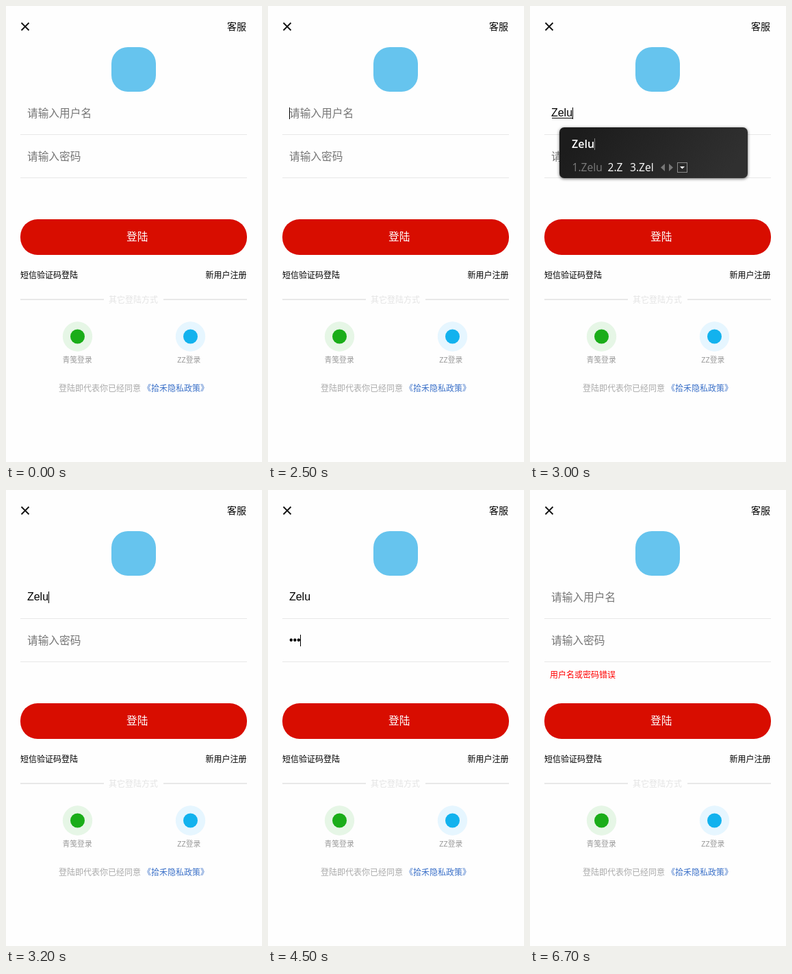
An HTML page with a canvas that plays this animation: 374 px wide and 665 px high, repeating every 8000 ms.

```html
<!DOCTYPE html>
<html lang="zh-CN">
<head>
<meta charset="utf-8">
<title>登陆</title>
<style>
  html, body { margin: 0; width: 100%; height: 100%; overflow: hidden; background: #fefefe; }
  canvas { display: block; }
</style>
</head>
<body>
<canvas id="stage" width="374" height="665"></canvas>
<script>
const ctx = document.getElementById('stage').getContext('2d');

const LOOP = 8000;
const CJK = '"Noto Sans CJK SC", "Noto Sans CJK", sans-serif';
const FIELD = '"Liberation Sans", Arial, sans-serif';
const IME = '"Open Sans", "Noto Sans", sans-serif';
const USER = 'Zelu';
const LEFT = 30.9;

// Times at which each character appears
const userKeys = [2700, 2800, 2900, 3000];
const passKeys = [4200, 4300, 4500, 4600, 4600, 4800];
const caretOn = [[700, 1100], [1600, 2100], [2500, 3900], [4200, 5200], [5700, 6100]];
const IME_END = 3200, PASS_FOCUS = 3500, FAIL = 6700;

const typed = (keys, t) => t < FAIL ? keys.filter(k => t >= k).length : 0;

function text(str, x, y, size, color, family = CJK, weight = 400) {
  ctx.font = `${weight} ${size}px ${family}`;
  ctx.fillStyle = color;
  ctx.fillText(str, x, y);
  return ctx.measureText(str).width;
}

function rect(x, y, w, h, color) {
  ctx.fillStyle = color;
  ctx.fillRect(x, y, w, h);
}

function roundRect(x, y, w, h, r, color) {
  ctx.beginPath();
  ctx.roundRect(x, y, w, h, r);
  ctx.fillStyle = color;
  ctx.fill();
}

function disc(x, y, r, color) {
  ctx.beginPath();
  ctx.arc(x, y, r, 0, Math.PI * 2);
  ctx.fillStyle = color;
  ctx.fill();
}

function triangle(x1, y1, x2, y2, x3, y3, color) {
  ctx.beginPath();
  ctx.moveTo(x1, y1);
  ctx.lineTo(x2, y2);
  ctx.lineTo(x3, y3);
  ctx.fillStyle = color;
  ctx.fill();
}

function drawPage() {
  rect(0, 0, 374, 665, '#fefefe');

  ctx.strokeStyle = '#111';
  ctx.lineWidth = 1.8;
  ctx.beginPath();
  ctx.moveTo(22.5, 24.5);
  ctx.lineTo(33.5, 35.5);
  ctx.moveTo(33.5, 24.5);
  ctx.lineTo(22.5, 35.5);
  ctx.stroke();
  text('客服', 323, 35, 14, '#000');

  roundRect(154, 60, 65, 65, 24, '#66c4ee');

  rect(21, 187, 331, 1, '#e8e8e8');
  rect(21, 250, 331, 1, '#e8e8e8');

  roundRect(21, 311, 331, 52, 25, '#d80d00');
  text('登陆', 176, 342, 15.7, '#fff');
  text('短信验证码登陆', 21, 397, 12, '#000');
  text('新用户注册', 291.5, 397, 12, '#000');

  rect(21, 427, 122, 2, '#e8e8e8');
  rect(230, 427, 122, 2, '#e8e8e8');
  text('其它登陆方式', 150, 433, 12, '#e4e4e4');

  disc(104.5, 482, 21.7, '#e6f6e6');
  disc(104.5, 482, 10.5, '#1aad19');
  text('青笺登录', 82.5, 520, 10.8, '#999');
  disc(269.5, 482, 21.7, '#e6f6ff');
  disc(269.5, 482, 10.5, '#12b2ee');
  text('ZZ登录', 250, 520, 10.8, '#999');

  text('登陆即代表你已经同意', 77, 562, 12, '#aaa');
  text('《拾禾隐私政策》', 200, 562, 12, '#3a70c8');
}

function drawField(value, hint, baseline, caret) {
  const width = value
    ? text(value, LEFT, baseline, 16, '#000', FIELD)
    : (text(hint, 31, baseline + 0.5, 15.7, '#757575'), 0);
  if (caret) {
    const x = Math.max(31, Math.floor(LEFT + width));
    rect(x, baseline - 13, 1, 17, '#000');
  }
  return width;
}

function drawDropButton(x, y) {
  ctx.strokeStyle = '#8a8a8a';
  ctx.lineWidth = 1;
  ctx.strokeRect(x + 0.5, y + 0.5, 14, 14);
  triangle(x + 4, y + 6, x + 11, y + 6, x + 7.5, y + 9.5, '#fff');
}

function drawIme(value) {
  const fill = ctx.createLinearGradient(100, 150, 260, 280);
  fill.addColorStop(0, '#1c1c1c');
  fill.addColorStop(1, '#303030');
  ctx.save();
  ctx.shadowColor = 'rgba(0,0,0,0.6)';
  ctx.shadowBlur = 4;
  ctx.shadowOffsetY = 1;
  roundRect(43, 177, 275, 74, 7, fill);
  ctx.restore();

  const width = text(value, 61, 207, 16, '#fff', IME, 600);
  rect(Math.round(61 + width), 193, 1, 17, '#808080');

  if (value !== USER) {
    drawDropButton(67, 225);
    return;
  }
  text('1.' + USER, 61.5, 241, 15.6, '#7c7c7c', IME);
  text('2.' + USER[0], 113.5, 241, 15.6, '#fff', IME);
  text('3.' + USER.slice(0, 3), 146, 241, 15.6, '#fff', IME);
  triangle(197, 230, 197, 241, 191, 235.5, '#777');
  triangle(203, 230, 203, 241, 209, 235.5, '#777');
  drawDropButton(215, 228);
}

function draw(t) {
  const user = USER.slice(0, typed(userKeys, t));
  const pass = '•'.repeat(typed(passKeys, t));
  const caret = caretOn.some(([from, to]) => t >= from && t < to);
  const inPass = t >= PASS_FOCUS;

  drawPage();
  const width = drawField(user, '请输入用户名', 161, caret && !inPass);
  drawField(pass, '请输入密码', 224, caret && inPass);

  if (user && t < IME_END) {
    rect(32, 163, Math.floor(width), 1, '#000');
    drawIme(user);
  }
  if (t >= FAIL) text('用户名或密码错误', 29, 274, 12, '#f00');
}

const start = performance.now();
function tick() {
  draw((performance.now() - start) % LOOP);
  requestAnimationFrame(tick);
}
tick();
</script>
</body>
</html>
```
